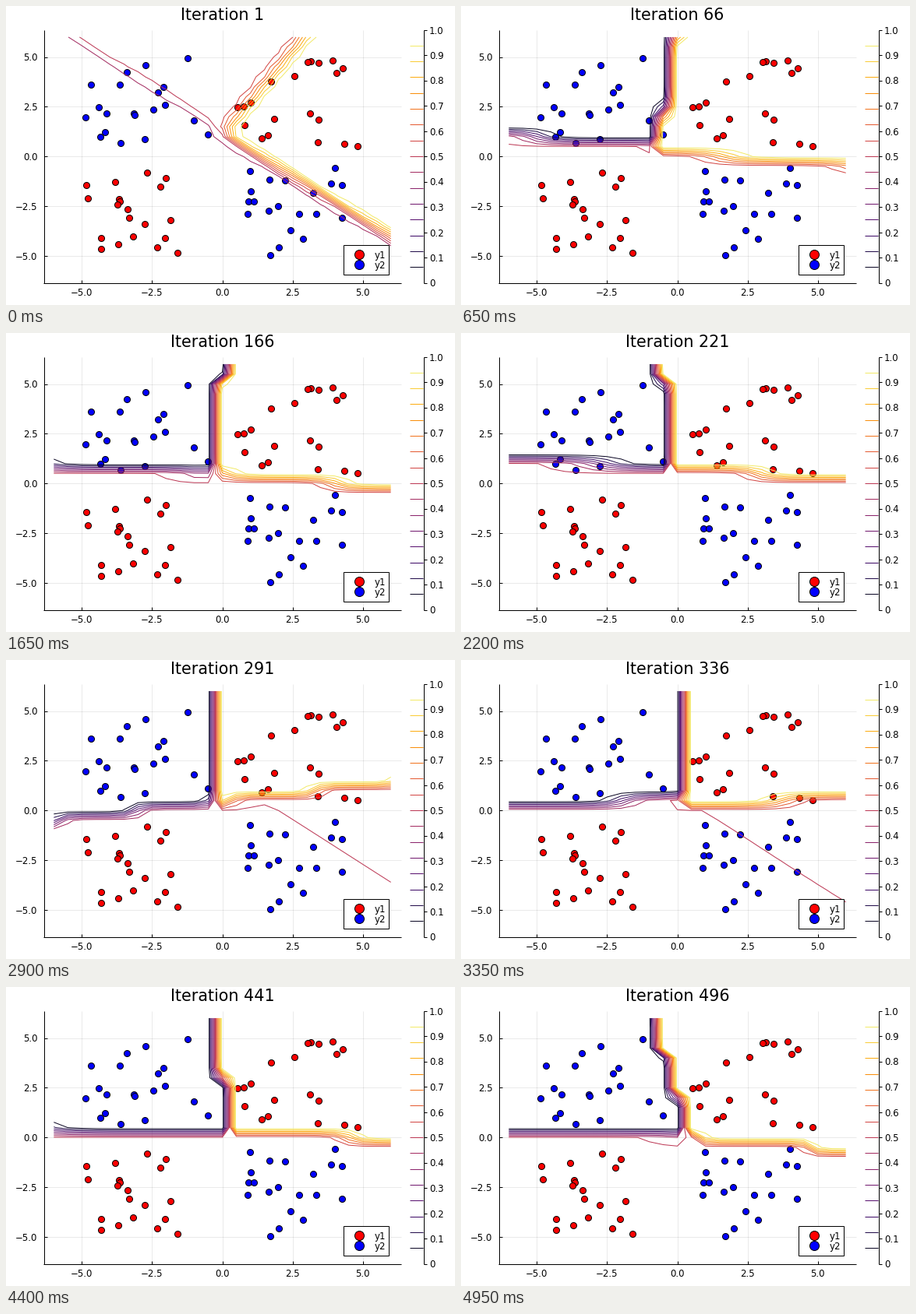
Write a matplotlib script that moves like this. It is 576x384 px and loops after 5 s.

```python
import numpy as np
import matplotlib.pyplot as plt
from matplotlib.animation import FuncAnimation
from matplotlib.patches import Rectangle

W, H, DPI = 576, 384, 100
FRAMES, INTERVAL, STEP = 100, 50, 5
PT = 72 / DPI  # points per pixel

plt.rcParams["font.family"] = "DejaVu Sans"
CMAP = plt.get_cmap("inferno")
LEVELS = np.arange(1, 16) / 16

# Point centres in pixels
RED = [
    (419, 70), (432, 80), (424, 86), (401, 73), (391, 71), (387, 72),
    (370, 90), (340, 96.5), (313.5, 123.5), (304.5, 129), (297, 130),
    (306, 152.5), (344, 144.5), (389.5, 137.5), (401, 146), (335.5, 166),
    (328, 170), (400, 175), (434, 176.5), (450.5, 179.5),
    (181, 214), (205, 221), (197.5, 232), (139.5, 226), (103, 230),
    (104.5, 247), (144.5, 248), (146, 250.5), (143, 254.5), (156, 261),
    (157.5, 271.5), (178, 279.5), (210.5, 275), (121.5, 298), (122, 311.5),
    (144, 306), (163, 296), (204, 297.5), (194, 309.5), (219.5, 316.5),
]
BLUE = [
    (232.5, 66.5), (178.5, 75.5), (154.5, 84.5), (108.5, 100.5), (146, 101),
    (202, 103.5), (194.5, 111), (203.5, 126.5), (188.5, 133), (119, 130),
    (128.5, 138), (163.5, 138), (165, 139.5), (102, 142.5), (240.5, 146.5),
    (127, 161.5), (121, 167.5), (146.5, 175.5), (178, 171), (259, 164.5),
    (313, 211.5), (338, 223), (358, 223.5), (422, 208), (417, 228),
    (431, 229.5), (314, 237.5), (394, 240), (310.5, 250.5), (318, 250.5),
    (309.5, 267), (337, 262.5), (349, 257), (376, 266.5), (398, 267),
    (431, 272), (365, 287.5), (380.5, 299), (350, 310), (338.5, 319.5),
]

# Poses of the decision surface: value upper left, value below, tilt below,
# then offset, slope and sharpness of the upright, left and right borders
POSE_AT = [0, 13, 23, 44, 58, 77, 99]
POSES = np.array([
    [.52, .41, 0, -.63, .589, 6, 1.3, -.88, 9, 1.2, -.865, 7],
    [0, .51, 0, -.77, .123, 35, .52, -.096, 25, .165, -.103, 18],
    [0, .51, 0, -1.03, .286, 90, .167, -.09, 25, .27, -.15, 18],
    [0, .51, 0, -.006, -.096, 90, .811, -.07, 25, .79, -.1, 27],
    [0, .50, .012, -.25, 0, 90, .558, .18, 25, .455, .165, 25],
    [0, .51, 0, .25, 0, 90, .49, -.05, 48, .22, -.03, 40],
    [0, .51, 0, .478, -.233, 50, .048, -.04, 38, .1, -.127, 45],
])
OFFSETS = [3, 6, 9]
JITTER = np.random.default_rng(4).normal(0, .07, (FRAMES, len(OFFSETS)))


def px(x):
    return 277.5 + 36.03 * x


def py(y):
    return 193.3 - 25.56 * y


def sigmoid(u):
    return .5 + .5 * np.tanh(u / 2)


AXIS = np.linspace(-6, 6, 25)
GX, GY = np.meshgrid(AXIS, AXIS)


def pose(i):
    p = np.array([np.interp(i, POSE_AT, col) for col in POSES.T])
    phase = np.interp(i, POSE_AT, range(len(POSE_AT)))
    p[OFFSETS] += JITTER[i] * abs(np.sin(np.pi * phase))
    return p


def surface(i):
    low, base, tilt, va, vb, vk, la, lb, lk, ra, rb, rk = pose(i)
    below = base + tilt * np.tanh(GY + .9 * GX - 1.8)
    side = sigmoid(vk * (GX - va - vb * GY))
    left = sigmoid(lk * (GY - la - lb * GX))
    right = sigmoid(rk * (GY - ra - rb * GX))
    return below + (low - below) * (1 - side) * left + (1 - below) * side * right


fig = plt.figure(figsize=(W / DPI, H / DPI), dpi=DPI, facecolor="white")
ax = fig.add_axes([0, 0, 1, 1])
ax.set_xlim(0, W)
ax.set_ylim(H, 0)
ax.axis("off")


def line(x0, y0, x1, y1, color="black", width=1, **kw):
    ax.plot([x0, x1], [y0, y1], color=color, lw=width * PT,
            solid_capstyle="butt", **kw)


def label(x, y, text, size=11.8, ha="center", **kw):
    return ax.text(x, y, text, fontsize=size * PT, ha=ha,
                   va="center_baseline", **kw)


def dots(points, color, diameter, z):
    xs, ys = zip(*points)
    ax.plot(xs, ys, "o", ms=diameter * PT, mfc=color, mec="black",
            mew=PT, zorder=z)


LEFT, RIGHT, TOP, BOTTOM = 48.5, 506.5, 30.5, 355.5

for v in (-5, -2.5, 0, 2.5, 5):
    text = f"{v:.1f}".replace("-", "\u2212")
    x, y = px(v), py(v)
    line(x, TOP, x, BOTTOM, alpha=.1, width=.8, zorder=1)
    line(LEFT, y, RIGHT, y, alpha=.1, width=.8, zorder=1)
    line(x, BOTTOM, x, BOTTOM - 4)
    line(LEFT, y, LEFT + 4, y)
    label(x, 367.5, text)
    label(40.5, y, text, ha="right")
line(LEFT, TOP, LEFT, BOTTOM + .5)
line(LEFT - .5, BOTTOM, RIGHT, BOTTOM)

# Colour scale
BAR = 535.5
line(BAR, TOP, BAR, BOTTOM + .5)
for k in range(11):
    y = BOTTOM - (BOTTOM - TOP) * k / 10
    line(BAR, y, BAR + 4, y)
    label(543, y, f"{k / 10:.1f}" if k else "0", ha="left")
for lev in LEVELS:
    y = BOTTOM - (BOTTOM - TOP) * lev
    line(518, y, BAR - .5, y, color=CMAP(lev))

dots(RED, "red", 8, 2)
dots(BLUE, "blue", 8, 2.1)

# Legend
ax.add_patch(Rectangle((432.5, 306.5), 58.5, 38.5, fc="white", ec="black",
                       lw=PT, zorder=5))
for y, color, name in ((319.3, "red", "y1"), (332.2, "blue", "y2")):
    dots([(453, y)], color, 12, 6)
    label(473, y, name, ha="left", zorder=6)

title = ax.text(277.5, 18.5, "", fontsize=20.7 * PT, ha="center",
                va="baseline")
lines = None


def draw(i):
    global lines
    if lines is not None:
        lines.remove()
    lines = ax.contour(px(GX), py(GY), surface(i), levels=LEVELS,
                       colors=[CMAP(v) for v in LEVELS],
                       linewidths=PT, linestyles="solid", zorder=3)
    title.set_text(f"Iteration {1 + STEP * i}")
    return []


anim = FuncAnimation(fig, draw, frames=FRAMES, interval=INTERVAL,
                     init_func=lambda: [], repeat=True, repeat_delay=0)
plt.show()
```
